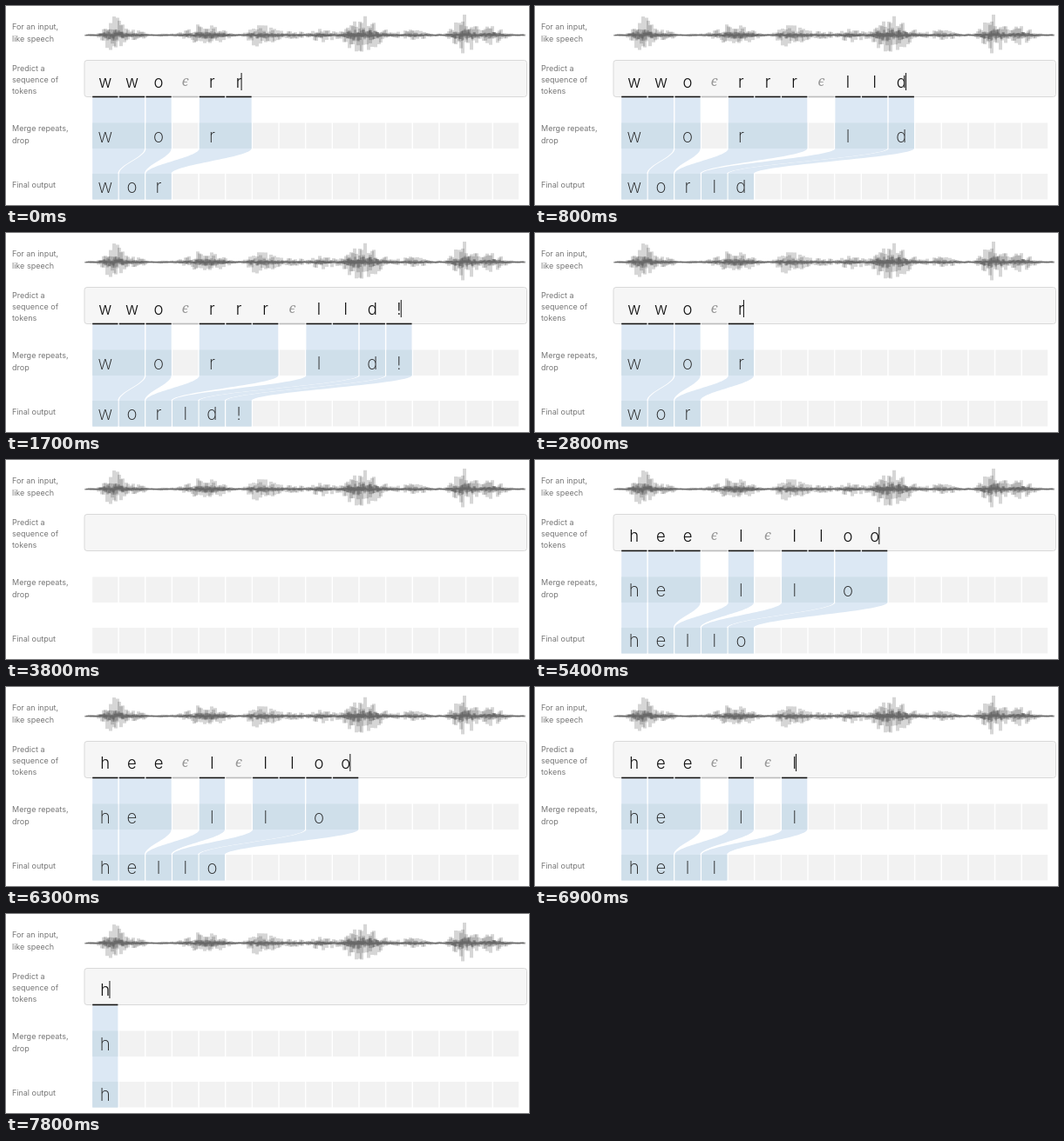
An HTML page for the animation above (7.9 s loop, 600x229 px).

```html
<!DOCTYPE html>
<html>
<head>
<meta charset="utf-8">
<style>
html, body { margin: 0; width: 100%; height: 100%; overflow: hidden; background: #fff; }
svg { display: block; font-family: Inter, Roboto, sans-serif; }
.label { font-size: 9px; fill: #777; }
.token { font-size: 18.5px; font-weight: 300; text-anchor: middle; fill: #111; }
.merged { font-size: 20.5px; font-weight: 200; text-anchor: middle; fill: #222; }
.blank { font: italic 16px "Noto Serif", "DejaVu Serif", serif; text-anchor: middle; fill: #999; }
</style>
</head>
<body>
<svg width="600" height="229" viewBox="0 0 600 229">
  <g id="still"></g>
  <g id="live"></g>
</svg>
<script>
const LOOP = 7900, STEP = 150, CELLS = 16, PITCH = 30.65, WIDTH = 29.2;
const MERGE_Y = 134.5, OUT_Y = 193, CELL_H = 29.5, BEND = 10;
const words = [
  { text: "wwoϵrrrϵlld!", start: 0, typed: 6, erase: 1850 },
  { text: "heeϵlϵlloo", start: 4000, typed: 1, erase: 6550 }
];
const still = document.getElementById("still");
const live = document.getElementById("live");

const left = i => 99.2 + i * PITCH;
const mid = i => left(i) + WIDTH / 2;
const rect = (x, y, w, h, fill, more = "") =>
  `<rect x="${x.toFixed(2)}" y="${y.toFixed(2)}" width="${w}" height="${h.toFixed(2)}" fill="${fill}" ${more}/>`;
const text = (s, x, y, cls) => `<text class="${cls}" x="${x}" y="${y}">${s}</text>`;

// Speech bursts: centre, spread to the left, spread to the right, height
const bursts = [
  [122, 9, 12, 24], [145, 14, 14, 6], [230, 20, 18, 14], [288, 9, 24, 13], [330, 30, 18, 4],
  [366, 18, 14, 8], [405, 13, 22, 24], [468, 20, 14, 6], [525, 11, 14, 24], [556, 10, 14, 11]
];
const loudness = x => Math.max(1.3, ...bursts.map(([c, l, r, h]) =>
  h * Math.exp(-(((x - c) / (x < c ? l : r)) ** 2) / 1.5)));

function wave() {
  let seed = 11, out = "";
  const rand = () => (seed = seed * 16807 % 2147483647) / 2147483647;
  const layer = (step, width, scale, opacity) => {
    for (let x = 90; x < 597 - width; x += step) {
      const a = scale * loudness(x + width / 2);
      const up = 0.5 + a * rand(), down = 0.5 + a * rand();
      out += rect(x, 33.5 - up, width, up + down, "#333", `opacity="${opacity}"`);
    }
  };
  layer(2, 4, 1, 0.2);
  layer(1, 3, 0.3, 0.25);
  return out;
}

function drawStill() {
  const labels = [
    ["For an input,", 27], ["like speech", 41],
    ["Predict a", 74.5], ["sequence of", 88], ["tokens", 101],
    ["Merge repeats,", 144], ["drop", 157.5], ["Final output", 209]
  ];
  let out = labels.map(([s, y]) => text(s, 7, y, "label")).join("") + wave();
  out += rect(90, 62.5, 507.5, 42, "#f6f6f6", 'rx="3" stroke="#d9d9d9"');
  for (let i = 0; i < CELLS; i++)
    for (const y of [MERGE_Y, OUT_Y]) out += rect(left(i), y, WIDTH, CELL_H, "#f2f2f2");
  still.innerHTML = out;
}

function groupsOf(tokens) {
  const groups = [];
  tokens.forEach((ch, i) => {
    if (ch === "ϵ") return;
    if (ch === tokens[i - 1]) groups[groups.length - 1].to = i;
    else groups.push({ ch, from: i, to: i });
  });
  return groups;
}

function drawGroup({ ch, from, to }, k) {
  const a = left(from), b = left(to) + WIDTH, c = left(k), d = c + WIDTH;
  const y = MERGE_Y + CELL_H, y1 = y + BEND, y2 = OUT_Y - BEND;
  return `<path fill="#dce8f4" d="M${a} 105.5V${y}C${a} ${y1} ${c} ${y2} ${c} ${OUT_Y}V222.5H${d}V${OUT_Y}C${d} ${y2} ${b} ${y1} ${b} ${y}V105.5Z"/>` +
    rect(a, MERGE_Y, b - a, CELL_H, "#cfdfea") + rect(c, OUT_Y, WIDTH, CELL_H, "#cfdfea") +
    text(ch, mid(from), 157, "merged") + text(ch, mid(k), 215, "merged");
}

function drawLive(tokens) {
  let out = groupsOf(tokens).map(drawGroup).join("");
  tokens.forEach((ch, i) => {
    const blank = ch === "ϵ";
    out += rect(left(i), 103.7, WIDTH, 1.6, blank ? "#bbb" : "#111");
    out += blank ? text(ch, mid(i), 92, "blank") : text(ch, mid(i), 94, "token");
  });
  live.innerHTML = out;
  if (!tokens.length) return;
  const glyphs = live.querySelectorAll("text");
  const last = glyphs[glyphs.length - 1];
  const x = mid(tokens.length - 1) + last.getComputedTextLength() / 2 - 0.8;
  live.insertAdjacentHTML("beforeend", rect(x, 77, 1, 20, "#111"));
}

let shown;
function frame() {
  const t = performance.now() % LOOP;
  const { text: word, start, typed, erase } = words[t < words[1].start ? 0 : 1];
  const n = Math.max(0, Math.min(
    word.length,
    typed + Math.floor((t - start) / STEP),
    word.length - 1 - Math.floor((t - erase) / STEP)));
  const now = word.slice(0, n);
  if (now !== shown) drawLive([...(shown = now)]);
  requestAnimationFrame(frame);
}

drawStill();
frame();
</script>
</body>
</html>
```
